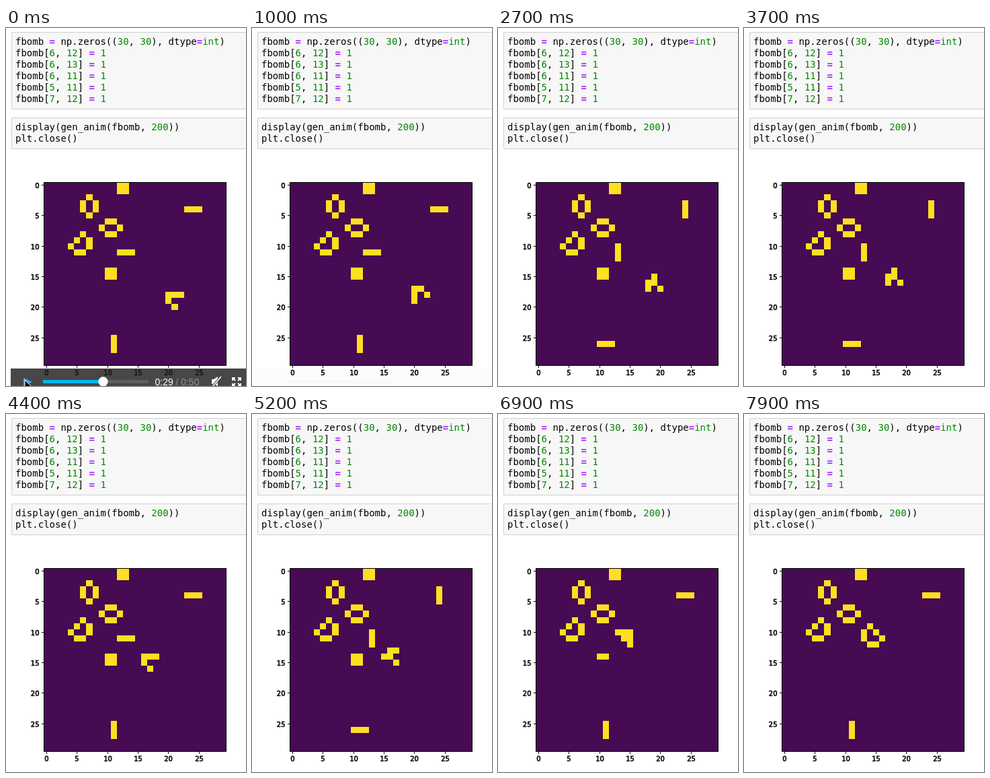
Recreate the animation shown at these times as an HTML page with a canvas. Size 357x532 px, loop 8000 ms.

```html
<!DOCTYPE html>
<html lang="en">
<head>
<meta charset="utf-8">
<title>Game of Life notebook</title>
<style>
  html, body { margin: 0; width: 100%; height: 100%; overflow: hidden; background: #fff; }
  canvas { position: absolute; left: 0; top: 0; }
  pre {
    position: absolute; left: 8px; right: 0; margin: 0; padding: 5px 0 0 5px;
    box-sizing: border-box; overflow: hidden;
    border: solid #cfcfcf; border-width: 1px 0 1px 1px; border-radius: 2px 0 0 2px;
    background: #f7f7f7; color: #000;
    font: 14px/17px "DejaVu Sans Mono", monospace;
  }
  #setup { top: 6px; height: 115px; }
  #show { top: 133px; height: 47px; }
  b { color: #a2f; }
  i { color: #080; font-style: normal; }
</style>
</head>
<body>
<canvas id="stage" width="357" height="532"></canvas>
<pre id="setup">fbomb <b>=</b> np.zeros((<i>30</i>, <i>30</i>), dtype<b>=</b><i>int</i>)
fbomb[<i>6</i>, <i>12</i>] <b>=</b> <i>1</i>
fbomb[<i>6</i>, <i>13</i>] <b>=</b> <i>1</i>
fbomb[<i>6</i>, <i>11</i>] <b>=</b> <i>1</i>
fbomb[<i>5</i>, <i>11</i>] <b>=</b> <i>1</i>
fbomb[<i>7</i>, <i>12</i>] <b>=</b> <i>1</i></pre>
<pre id="show">display(gen_anim(fbomb, <i>200</i>))
plt.close()</pre>
<script>
const ctx = document.getElementById('stage').getContext('2d');
const LOOP = 8000, N = 30, LAST = 30;
const LEFT = 56, TOP = 229, CELL = 9.07;

// Life patterns: row, column, shape
const seeds = [
  [0, 12, 'OO/OO'],
  [2, 6, '.O./O.O/O.O/.O.'],
  [4, 23, 'OOO'],
  [6, 9, '.OO./O..O/.OO.'],
  [8, 4, '..O./.O.O/O..O/.OO.'],
  [11, 12, 'OOO'],
  [14, 10, 'OO/OO'],
  [18, 20, 'OOO/O../.O.'],
  [25, 11, 'O/O/O']
];

function seedGrid() {
  const grid = new Uint8Array(N * N);
  for (const [row, col, shape] of seeds)
    shape.split('/').forEach((line, y) => [...line].forEach((ch, x) => {
      if (ch === 'O') grid[(row + y) * N + col + x] = 1;
    }));
  return grid;
}

function evolve(grid) {
  const at = (r, c) => r >= 0 && c >= 0 && r < N && c < N ? grid[r * N + c] : 0;
  return grid.map((live, k) => {
    const r = Math.floor(k / N), c = k % N;
    let sum = -live;
    for (let y = -1; y <= 1; y++)
      for (let x = -1; x <= 1; x++) sum += at(r + y, c + x);
    return sum === 3 || (live && sum === 2) ? 1 : 0;
  });
}

const gens = [seedGrid()];
while (gens.length <= LAST) gens.push(evolve(gens[gens.length - 1]));

// Four generations a second on a 100 ms clock, with one late tick
function genStart(k) {
  const late = k === 9 || k > 10 ? 100 : 0;
  return 300 + 500 * (k >> 1) + (k % 2) * 300 + late;
}

function genAt(t) {
  let k = 0;
  while (k < LAST && genStart(k + 1) <= t) k++;
  return k;
}

function rect(color, x, y, w, h) {
  ctx.fillStyle = color;
  ctx.fillRect(x, y, w, h);
}

function path(points, close) {
  ctx.beginPath();
  points.forEach(([x, y]) => ctx.lineTo(x, y));
  if (close) ctx.closePath();
}

function label(text, x, y) {
  ctx.fillText(text, x, y);
  ctx.strokeText(text, x, y);
}

function drawPlot(grid) {
  const px = c => Math.round(LEFT + c * CELL);
  const py = r => Math.round(TOP + r * CELL);
  rect('#460b53', 56, 229, 272, 272);
  for (let r = 0; r < N; r++)
    for (let c = 0; c < N; c++)
      if (grid[r * N + c])
        rect('#ffdf20', px(c), py(r), px(c + 1) - px(c), py(r + 1) - py(r));

  ctx.strokeStyle = '#000';
  ctx.lineWidth = 1;
  ctx.strokeRect(56.5, 229.5, 271, 272);
  ctx.font = '10px "DejaVu Sans", sans-serif';
  ctx.lineWidth = 0.6;
  for (let v = 0; v < N; v += 5) {
    const x = Math.floor(LEFT + (v + 0.5) * CELL), y = Math.floor(TOP + (v + 0.5) * CELL);
    rect('#000', x, 502, 1, 3);
    rect('#000', 53, y, 3, 1);
    ctx.textAlign = 'center';
    label(v, x + 0.5, 516);
    ctx.textAlign = 'right';
    label(v, 49.5, y + 4.5);
  }
}

function drawSpeaker() {
  ctx.fillStyle = '#fff';
  path([[306, 522], [309, 522], [315, 518], [315, 532], [309, 529], [306, 529]], true);
  ctx.fill();
  path([[307, 533], [320, 518]]);
  ctx.strokeStyle = '#484848';
  ctx.lineWidth = 3.5;
  ctx.stroke();
  ctx.strokeStyle = '#fff';
  ctx.lineWidth = 1.6;
  ctx.stroke();
}

function drawFullscreen() {
  ctx.strokeStyle = '#fff';
  ctx.lineWidth = 2;
  for (const sx of [-1, 1])
    for (const sy of [-1, 1]) {
      const at = (x, y) => [343 + sx * x, 526 + sy * y];
      path([at(2, 6), at(6, 6), at(6, 2)]);
      ctx.stroke();
      path([at(6, 6), at(2, 2)]);
      ctx.stroke();
    }
}

function drawCursor(x, y) {
  path([[x, y], [x, y + 14], [x + 3, y + 11], [x + 6, y + 16], [x + 8, y + 15],
    [x + 6, y + 10], [x + 10, y + 10]], true);
  ctx.fillStyle = '#000';
  ctx.fill();
  ctx.strokeStyle = '#fff';
  ctx.lineWidth = 1;
  ctx.stroke();
}

function drawControls(t) {
  const fade = t < 700 ? 1 : Math.max(0, 1 - (t - 600) / 406);
  if (!fade) return;
  const playing = t >= 300;
  ctx.globalAlpha = fade;
  rect('rgba(26,26,26,.8)', 7, 506, 350, 26);

  if (playing) {
    rect('#fff', 27, 520, 4, 12);
    rect('#fff', 34, 520, 4, 12);
  } else {
    ctx.fillStyle = '#48a0e0';
    path([[26, 519.5], [39, 526], [26, 532.5]], true);
    ctx.fill();
  }

  const knob = 144.5 + Math.max(0, t - 300) * 0.00314;
  rect('#5e5e5e', 55, 523, 157, 5);
  rect('#00b6f0', 55, 523, knob - 55, 5);
  ctx.fillStyle = '#fff';
  ctx.beginPath();
  ctx.arc(knob, 525.5, 7.2, 0, 2 * Math.PI);
  ctx.fill();

  ctx.font = '14px "Liberation Sans", Arial, sans-serif';
  ctx.textAlign = 'left';
  ctx.fillText('0:29', 221.5, 531);
  ctx.fillStyle = '#929292';
  ctx.fillText(' / 0:50', 248.5, 531);
  drawSpeaker();
  drawFullscreen();
  ctx.globalAlpha = 1;
}

function draw(time) {
  const t = Math.floor((time % LOOP) / 100) * 100;
  ctx.clearRect(0, 0, 357, 532);
  ctx.fillStyle = '#000';
  drawPlot(gens[genAt(t)]);
  drawControls(t);
  if (t < 500) drawCursor(28, 523 + Math.max(0, t - 200) * 0.04);
}

const start = performance.now();
function tick() {
  draw(performance.now() - start);
  requestAnimationFrame(tick);
}
tick();
</script>
</body>
</html>
```
